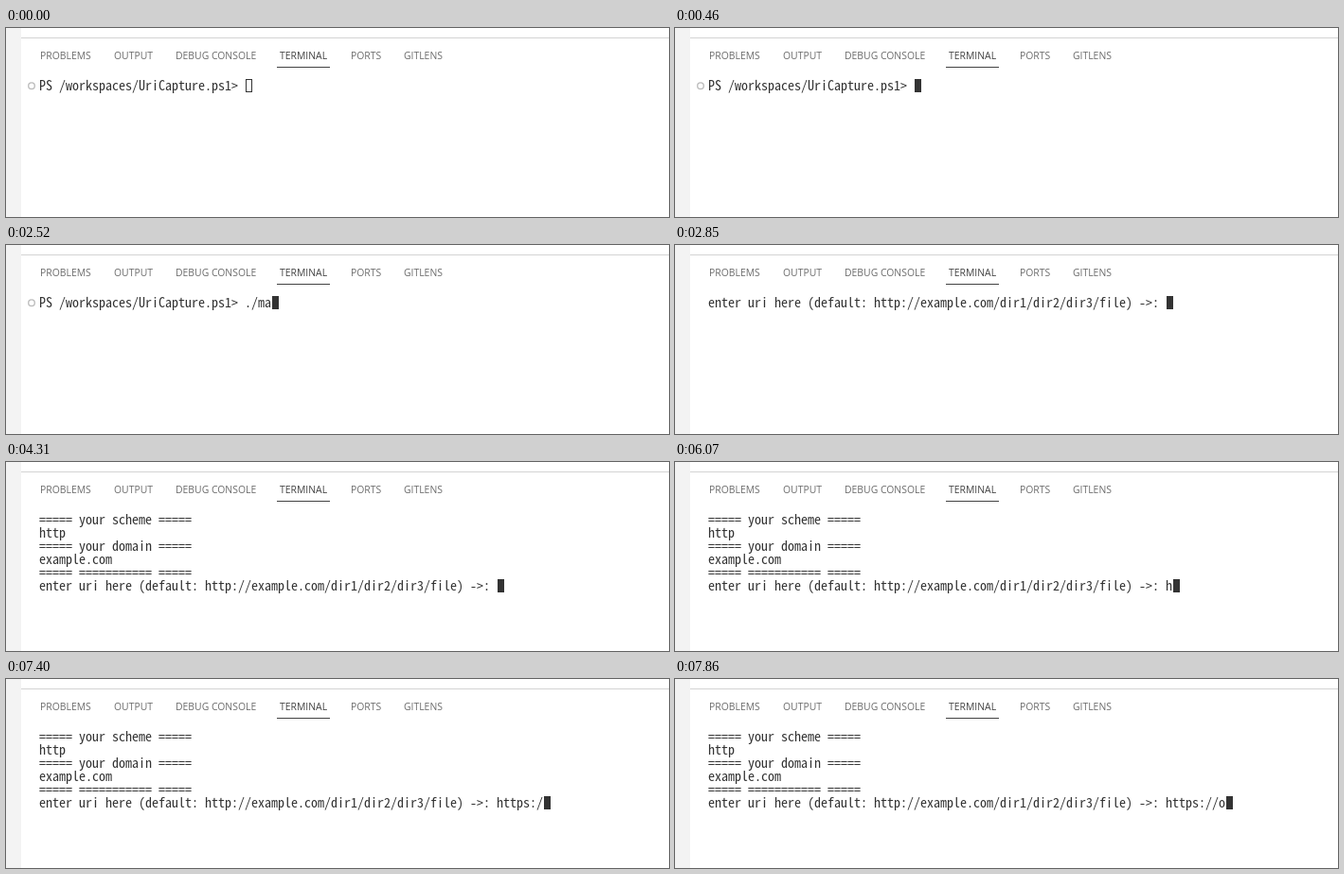
Write an HTML page that moves like this. It is 700 px wide and 200 px high and loops after 7990 ms.

```html
<!DOCTYPE html>
<html lang="en">
<head>
<meta charset="utf-8">
<title>Terminal session</title>
<style>
  html, body { margin: 0; width: 100%; height: 100%; overflow: hidden; background: #fff; }
  svg { display: block; width: 700px; height: 200px; }
  .tabs { font: 10.4px "Open Sans", "Noto Sans", sans-serif; fill: #6c6c6c; }
  .tabs .active { fill: #424242; }
  #screen { font: 300 14px "Noto Sans Mono CJK JP", "Noto Sans CJK JP", monospace; fill: #333; }
  #screen text { white-space: pre; }
</style>
</head>
<body>
<svg viewBox="0 0 700 200">
  <rect width="16" height="200" fill="#f3f3f3"/>
  <rect x="16" y="10" width="684" height="1" fill="#d3d3d3"/>
  <g class="tabs">
    <text x="36" y="33">PROBLEMS</text>
    <text x="114" y="33">OUTPUT</text>
    <text x="179" y="33">DEBUG CONSOLE</text>
    <text x="289" y="33" class="active">TERMINAL</text>
    <text x="364" y="33">PORTS</text>
    <text x="420" y="33">GITLENS</text>
  </g>
  <rect x="286" y="41" width="56" height="1" fill="#424242"/>
  <circle id="marker" cx="27" cy="61.2" r="3.3" fill="none" stroke="#bdbdbd" stroke-width="1.4"/>
  <g id="screen"></g>
  <rect id="cursor" stroke="#333"/>
  <path id="pointer" d="M696 47.5h3.5v15h-3.5" fill="none" stroke="#333"/>
</svg>
<script>
const LOOP = 7990, CELL = 7, ROW = 14, LEFT = 36, TOP = 54;
const FOCUS = 460, RUN = 2850, ANSWER = 4310;
const shell = "PS /workspaces/UriCapture.ps1> ";
const question = "enter uri here (default: http://example.com/dir1/dir2/dir3/file) ->: ";
const report = ["===== your scheme =====", "http", "===== your domain =====",
  "example.com", "===== =========== ====="];

// Each key press time reveals one more character.
const command = { text: "./main", keys: [1920, 1990, 2320, 2430, 2540, 2650] };
const uri = { text: "https://o", keys: [6070, 6270, 6400, 6660, 6860, 7130, 7400, 7520, 7860] };
const typed = ({ text, keys }, t) => text.slice(0, keys.filter(k => k <= t).length);

const byId = id => document.getElementById(id);
const [marker, screen, cursor, pointer] = ["marker", "screen", "cursor", "pointer"].map(byId);
const set = (el, attrs) => Object.entries(attrs).forEach(([k, v]) => el.setAttribute(k, v));
const show = (el, on) => set(el, { visibility: on ? "visible" : "hidden" });

const rows = Array.from({ length: report.length + 1 }, (_, i) => {
  const row = document.createElementNS("http://www.w3.org/2000/svg", "text");
  set(row, { x: LEFT - 1, y: TOP + 12 + i * ROW });
  return screen.appendChild(row);
});

function linesAt(t) {
  if (t < RUN) return [shell + typed(command, t)];
  if (t < ANSWER) return [question];
  return [...report, question + typed(uri, t)];
}

function draw(now) {
  const t = now % LOOP;
  const lines = linesAt(t);
  rows.forEach((row, i) => {
    const line = lines[i] || "";
    if (row.textContent !== line) row.textContent = line;
  });
  const last = lines.length - 1;
  set(cursor, {
    x: LEFT + lines[last].length * CELL + 0.5, y: TOP + last * ROW + 0.5,
    width: CELL - 1, height: ROW - 1, fill: t < FOCUS ? "none" : "#333"
  });
  show(marker, t < RUN);
  show(pointer, t >= 130 && t < 200);
  requestAnimationFrame(draw);
}
draw(0);
</script>
</body>
</html>
```
